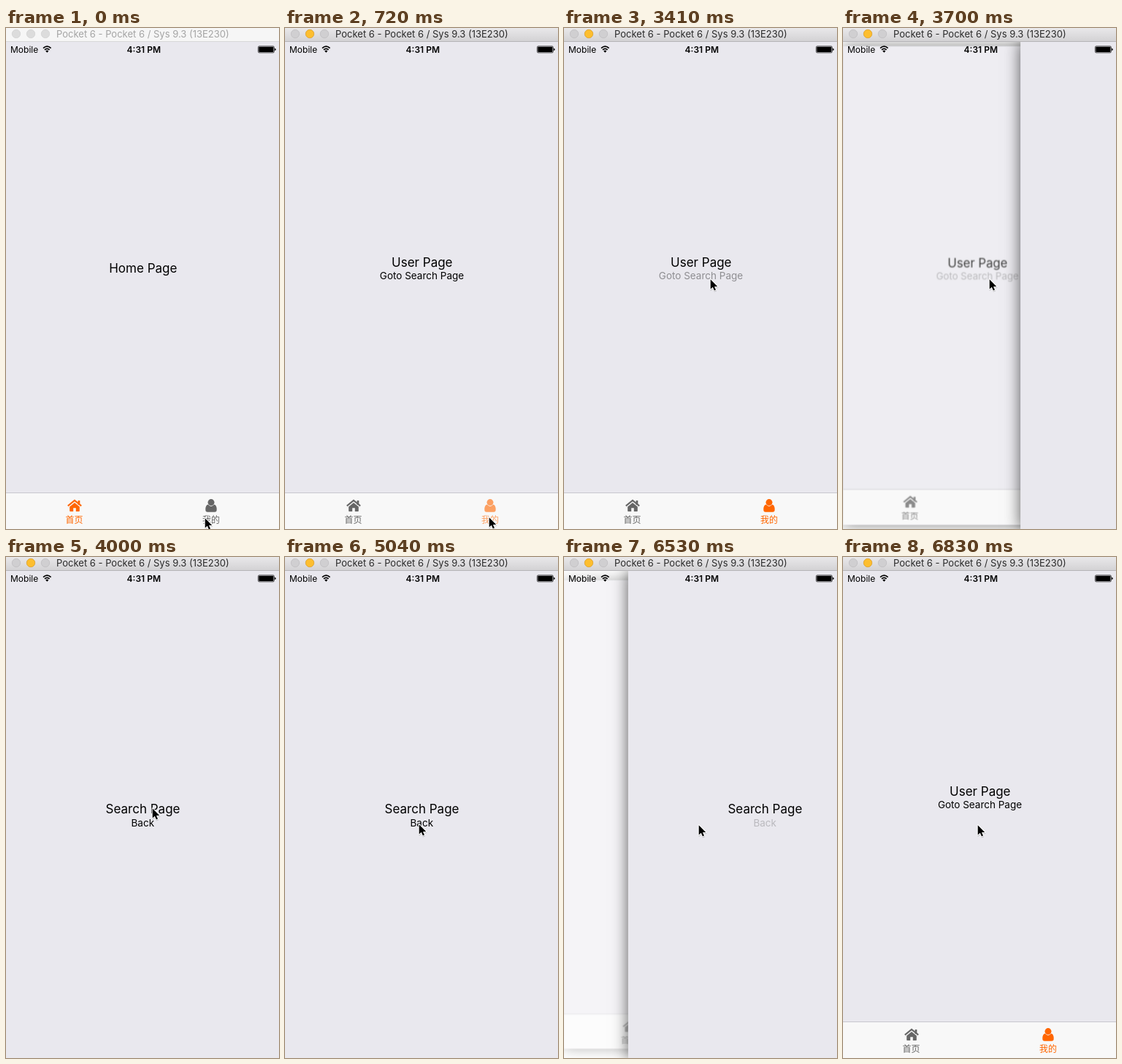
An HTML page that plays this animation: 374 px wide and 686 px high, repeating every 8 s.

```html
<!DOCTYPE html>
<html lang="zh-CN">
<head>
<meta charset="utf-8">
<title>Tab and stack navigation</title>
<style>
  /* 0 = tab scene on show, 1 = search card fully pushed */
  @property --push { syntax: "<number>"; inherits: true; initial-value: 0; }

  html, body { margin: 0; width: 100%; height: 100%; overflow: hidden; }
  body { position: relative; background: #fff; font-family: Inter, "Open Sans", sans-serif; }
  svg { display: block; position: absolute; left: 0; top: 0; }
  .step { animation: 8s step-end infinite; }

  .screen {
    position: absolute; left: 0; top: 19px; width: 374px; height: 667px;
    overflow: hidden; background: #fff; animation-name: push;
  }
  .scene {
    position: absolute; inset: 0; background: #e9e8ee;
    box-shadow: 0 0 20px rgba(0, 0, 0, .65);
  }
  .under {
    opacity: calc(1 - .7 * var(--push));
    transform: translateX(calc(-10px * var(--push))) scale(calc(1 - .05 * var(--push)));
  }
  .card {
    opacity: min(1, 100 * var(--push));
    transform: translateX(calc(374px * (1 - var(--push))));
  }

  .heading { font-size: 17px; text-anchor: middle; }
  .link { font-size: 13.5px; text-anchor: middle; }
  .tab { fill: currentColor; stroke: none; }
  .tab text { font: 12px "Noto Sans CJK SC", "Noto Sans CJK", sans-serif; text-anchor: middle; }

  .home-page { animation-name: home-page; }
  .user-page { animation-name: user-page; }
  .home-tab { animation-name: home-tab; }
  .user-tab { animation-name: user-tab; }
  .goto { animation-name: press-goto; }
  .back { animation-name: press-back; }
  .focused { animation-name: focus; }
  .cursor { animation-name: point; }

  @keyframes focus { 0% { opacity: 0; } 7.125% { opacity: 1; } }
  @keyframes home-page { 0% { opacity: 1; } 9% { opacity: 0; } }
  @keyframes user-page { 0% { opacity: 0; } 9% { opacity: 1; } }
  @keyframes home-tab { 0% { color: #f60; } 9% { color: #666; } }
  @keyframes user-tab {
    0% { color: #666; opacity: 1; }
    9% { color: #f60; opacity: .6; }
    10.875% { color: #f60; opacity: 1; }
  }
  @keyframes press-goto {
    0% { opacity: 1; } 42.625% { opacity: .39; } 44.375% { opacity: .3; } 50% { opacity: 1; }
  }
  @keyframes press-back {
    0% { opacity: 1; } 78% { opacity: .5; } 79.875% { opacity: .2; } 85.375% { opacity: 1; }
  }
  @keyframes push {
    0% { --push: 0; }
    44.375% { --push: .015; }
    46.25% { --push: .35; }
    48.125% { --push: .952; }
    50% { --push: 1; }
    81.625% { --push: .765; }
    83.5% { --push: .2; }
    85.375% { --push: 0; }
  }
  @keyframes point {
    0% { transform: translate(272px, 670px); }
    1.875% { transform: translate(276px, 669px); }
    3.75% { transform: translate(279px, 669px); }
    24% { transform: translate(279px, 662px); }
    25.875% { transform: translate(270px, 530px); }
    27.75% { transform: translate(218px, 397px); }
    29.5% { transform: translate(207px, 363px); }
    31.375% { transform: translate(200px, 343px); }
    61.25% { transform: translate(189px, 356px); }
    63% { transform: translate(183px, 365px); }
    66.75% { transform: translate(184px, 366px); }
  }
</style>
</head>
<body>

<div class="screen step">
  <div class="scene under">
    <svg width="374" height="667" viewBox="0 19 374 667">
      <text class="heading home-page step" x="187.8" y="335">Home Page</text>
      <g class="user-page step">
        <text class="heading" x="187.8" y="327">User Page</text>
        <text class="link goto step" x="187.5" y="344">Goto Search Page</text>
      </g>
      <path fill="#f8f8f8" d="M0 636H374V686H0z"/>
      <path fill="#c8c8ce" d="M0 636H374V637H0z"/>
      <g class="tab home-tab step">
        <path d="M84.8 654.4L94 646.9L103.2 654.4" fill="none" stroke="currentColor" stroke-width="2"/>
        <path d="M98.6 647H101.3V653H98.6z"/>
        <path d="M87.2 655.6L94 650L100.8 655.6V661.2Q100.8 662 100 662H95.8V657.2H92.2V662H88Q87.2 662 87.2 661.2z"/>
        <text x="93.5" y="678.3">首页</text>
      </g>
      <g class="tab user-tab step">
        <circle cx="281" cy="649.6" r="4.5"/>
        <path d="M273.3 659.6Q273.3 653 277 652.6Q278.8 654.9 281 654.9T285 652.6Q288.7 653 288.7 659.6Q288.7 662.8 285.9 662.8H276.1Q273.3 662.8 273.3 659.6z"/>
        <text x="281" y="678.3">我的</text>
      </g>
    </svg>
  </div>
  <div class="scene card">
    <svg width="374" height="667" viewBox="0 19 374 667">
      <text class="heading" x="187.5" y="351">Search Page</text>
      <text class="link back step" x="187.3" y="368.6">Back</text>
    </svg>
  </div>
</div>

<svg width="374" height="686" viewBox="0 0 374 686">
  <defs>
    <linearGradient id="bar" x2="0" y2="1">
      <stop stop-color="#e9e8ea"/><stop offset="1" stop-color="#d2d1d3"/>
    </linearGradient>
    <g id="lights" stroke-width=".8">
      <circle cx="14" cy="8" r="5.7"/><circle cx="34" cy="8" r="5.7"/><circle cx="54" cy="8" r="5.7"/>
    </g>
    <text id="caption" x="69" y="13" font-size="13">Pocket 6 - Pocket 6 / Sys 9.3 (13E230)</text>
    <path id="arrow" d="M0 0V13.4L3.1 10.6L5.2 15.2L7.3 14.3L5.3 9.8H9.6z"/>
  </defs>

  <g>
    <path fill="#f6f6f6" d="M0 0H374V19H0z"/>
    <path fill="#d8d8d8" d="M0 18H374V19H0z"/>
    <use href="#lights" fill="#dcdcdc" stroke="#d2d2d2"/>
    <use href="#caption" fill="#a4a4a4"/>
  </g>
  <g class="focused step">
    <path fill="url(#bar)" d="M0 0H374V19H0z"/>
    <path fill="#b5b4b7" d="M0 18H374V19H0z"/>
    <use href="#lights" fill="#d0cfd1" stroke="#bfbec0"/>
    <circle cx="34" cy="8" r="5.7" fill="#fdbe2f" stroke="#e3a52b" stroke-width=".8"/>
    <use href="#caption" fill="#2a2a2a"/>
  </g>

  <g font-size="12">
    <text x="6" y="34">Mobile</text>
    <text x="188.8" y="33.6" text-anchor="middle" font-weight="600">4:31 PM</text>
    <path d="M51 27.6Q56.3 22.7 61.6 27.6M53 29.9Q56.3 26.8 59.6 29.9" fill="none" stroke="#000" stroke-width="1.7"/>
    <path d="M54.2 31.5Q56.3 29.7 58.4 31.5L56.3 33.8z"/>
    <rect x="345.4" y="24.9" width="22" height="9" rx="1.6" fill="none" stroke="#000" stroke-width=".7"/>
    <rect x="346.3" y="25.8" width="20.2" height="7.2" rx=".8"/>
    <path d="M368.2 27.8Q369.8 28.2 369.8 29.4T368.2 31z"/>
  </g>

  <g class="cursor step" stroke-linejoin="round">
    <use href="#arrow" x="1" y="2.4" opacity=".18" stroke="#000" stroke-width="1.6"/>
    <use href="#arrow" x=".7" y="1.2" stroke="#fff" stroke-width="2" paint-order="stroke"/>
  </g>
</svg>

</body>
</html>
```
